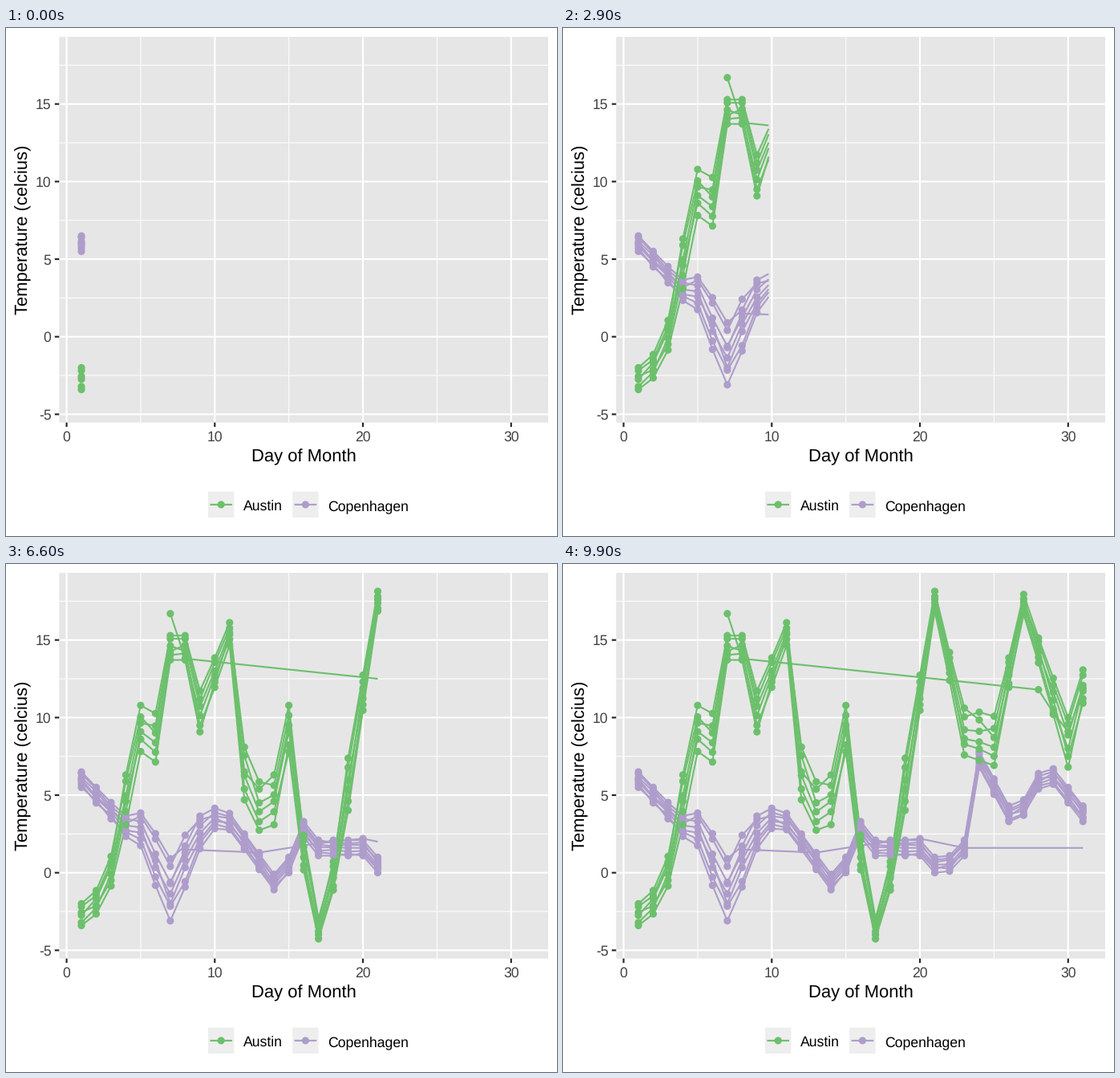
A matplotlib script for the animation above (10000 ms loop, 687x633 px).

```python
import matplotlib.pyplot as plt
import numpy as np
from matplotlib.animation import FuncAnimation
from matplotlib.patches import Rectangle

W, H, DPI = 687, 633, 64
FRAMES, INTERVAL = 100, 100
PT = 72 / DPI  # points per pixel

LEFT, RIGHT, TOP, BOTTOM = 66.3, 676, 11, 491.6
XMIN, XMAX, YMIN, YMAX = -0.5, 32.5, -5.53, 19.33

GREEN, PURPLE = "#6cc06c", "#ae9dcb"
PANEL, KEY = "#e6e6e6", "#eeeeee"
LABEL, TICK = "#424242", "#262626"

plt.rcParams.update({
    "font.family": "Liberation Sans",
    "path.snap": False,
    "path.simplify": False,
    "text.hinting": "none",
    "lines.solid_capstyle": "butt",
    "lines.solid_joinstyle": "round",
})

DAYS = np.arange(1, 32)

# Turning points of the weather, day: temperature.
AUSTIN = {1: -2.7, 2: -1.9, 3: 0.1, 5: 9.3, 6: 8.7, 7: 14.5, 8: 14.5, 9: 10.4,
          11: 15.4, 12: 6.4, 13: 4.3, 14: 4.7, 15: 9.3, 16: 1.3, 17: -3.6,
          18: -0.2, 21: 17.5, 23: 9.1, 25: 8.5, 27: 17.3, 30: 8.4, 31: 12}
COPENHAGEN = {1: 6, 4: 3, 5: 2.8, 7: -1.1, 9: 2.6, 10: 3.5, 11: 3.3, 14: -0.6,
              15: 0.5, 16: 2.8, 17: 1.6, 20: 1.6, 21: 0.5, 22: 0.6, 23: 1.6,
              24: 7.3, 26: 3.8, 27: 4.2, 28: 5.9, 29: 6.2, 31: 3.8}

# One year in each city has long gaps in its record.
AUSTIN_GAPPY = {7: 16.7, 8: 13.8, 28: 11.8, 29: 10.3, 30: 9.1, 31: 11.7}
COPENHAGEN_GAPPY = {7: -0.7, 8: 1.5, 13: 1.3, 17: 1.9, 20: 2.2, 23: 1.6}


def bump(x, centre, width):
    return np.exp(-((x - centre) / width) ** 2)


def austin_spread(temps):
    return 0.6 + 1.1 * bump(temps, 6.5, 6)  # mild days vary most


def copenhagen_spread(temps):
    return 0.5 + 1.5 * bump(DAYS, 7, 2)  # the first cold snap varies most


def make_years(keys, spread, count, gappy, seed):
    """Fan years out around the key points, letting neighbours swap rank."""
    rng = np.random.default_rng(seed)
    centre = np.interp(DAYS, list(keys), list(keys.values()))
    width = spread(centre)
    order = np.arange(count)
    years = np.zeros((count, len(DAYS)))
    for d in range(len(DAYS)):
        rank = np.linspace(1, -1, count)
        rank[1:-1] += rng.uniform(-0.15, 0.15, count - 2)
        years[order, d] = centre[d] + width[d] * rank
        r = rng.integers(count - 1)
        order[[r, r + 1]] = order[[r + 1, r]]
    full = [(DAYS, temps) for temps in years]
    return full + [(np.array(list(gappy)), np.array(list(gappy.values())))]


def px(day):
    return LEFT + (np.asarray(day) - XMIN) / (XMAX - XMIN) * (RIGHT - LEFT)


def py(temp):
    return BOTTOM - (np.asarray(temp) - YMIN) / (YMAX - YMIN) * (BOTTOM - TOP)


fig = plt.figure(figsize=(W / DPI, H / DPI), dpi=DPI, facecolor="white")
ax = fig.add_axes([0, 0, 1, 1])
ax.set_xlim(0, W)
ax.set_ylim(H, 0)
ax.axis("off")


def rect(x0, y0, x1, y1, color):
    ax.add_patch(Rectangle((x0, y0), x1 - x0, y1 - y0, fc=color, lw=0, zorder=0))


def line(xs, ys, color, width=2.13, z=1):
    return ax.plot(xs, ys, color=color, lw=width * PT, zorder=z)[0]


def dot_path(xs, ys):
    """Tiny strokes; with round caps they become dots at exact positions."""
    xs, ys = np.asarray(xs), np.asarray(ys)
    gap = np.full(len(xs), np.nan)
    return (np.column_stack([xs - 0.01, xs + 0.01, gap]).ravel(),
            np.column_stack([ys, ys, gap]).ravel())


def dots(xs, ys, color, z):
    marks = line(*dot_path(xs, ys), color, 9.3, z)
    marks.set_solid_capstyle("round")
    return marks


def text(x, y, s, size=17.6, color="black", ha="center", rotation=0):
    ax.text(x, y, s, fontsize=size * PT, color=color, ha=ha, va="baseline",
            rotation=rotation, rotation_mode="anchor")


def draw_axes():
    rect(LEFT, TOP, RIGHT, BOTTOM, PANEL)
    for x in (5, 15, 25):
        line([px(x)] * 2, [TOP, BOTTOM], "white", 1.07)
    for y in np.arange(-2.5, 18, 5):
        line([LEFT, RIGHT], [py(y)] * 2, "white", 1.07)
    for y in range(-5, 16, 5):
        line([LEFT, RIGHT], [py(y)] * 2, "white")
        line([LEFT - 5.5, LEFT], [py(y)] * 2, TICK)
        text(LEFT - 9.9, py(y) + 6.3, str(y), color=LABEL, ha="right")
    for x in range(0, 31, 10):
        line([px(x)] * 2, [TOP, BOTTOM], "white")
        line([px(x)] * 2, [BOTTOM, BOTTOM + 5.5], TICK)
        text(px(x), 514.9, str(x), color=LABEL)
    text((LEFT + RIGHT) / 2, 540.3, "Day of Month", 22)
    text(27, (TOP + BOTTOM) / 2, "Temperature (celcius)", 22, rotation=90)


def draw_legend():
    for x, color, name in ((268.2, GREEN, "Austin"), (373.4, PURPLE, "Copenhagen")):
        rect(x - 16.2, 577.6, x + 16.2, 610, KEY)
        line([x - 13.8, x + 13.8], [593.9] * 2, color)
        dots([x], [593.9], color, 2)
        text(x + 27.4, 601, name, ha="left")


draw_axes()
draw_legend()

tracks = []
for color, years in (
        (PURPLE, make_years(COPENHAGEN, copenhagen_spread, 7, COPENHAGEN_GAPPY, 9)),
        (GREEN, make_years(AUSTIN, austin_spread, 6, AUSTIN_GAPPY, 4))):
    for days, temps in years:
        tracks.append((days, temps, line([], [], color, z=3), dots([], [], color, 4)))


def update(frame):
    now = 1 + 30 * frame / (FRAMES - 1)
    for days, temps, path, marks in tracks:
        seen = days <= now + 1e-9
        xs, ys = days[seen], temps[seen]
        marks.set_data(*dot_path(px(xs), py(ys)))
        if len(xs):
            xs = np.append(xs, now)
            ys = np.append(ys, np.interp(now, days, temps))
        path.set_data(px(xs), py(ys))
    return [artist for track in tracks for artist in track[2:]]


anim = FuncAnimation(fig, update, frames=FRAMES, interval=INTERVAL,
                     repeat=True, repeat_delay=0, blit=False)
plt.show()
```
